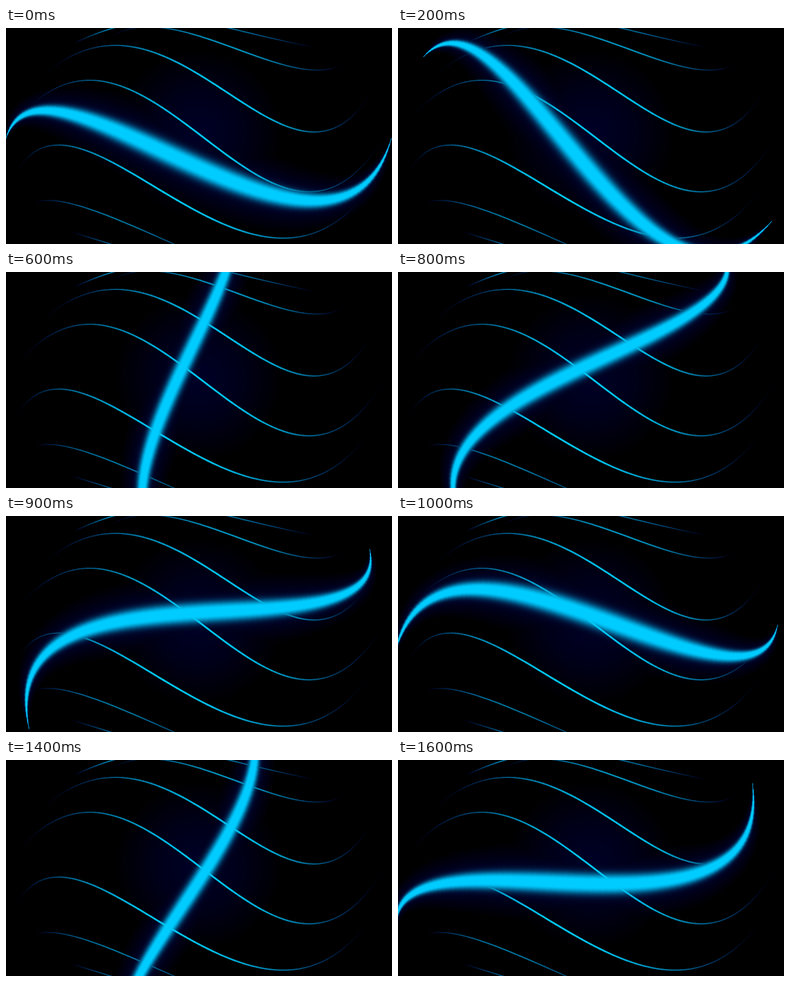
Animation, 662 px wide and 372 px high, one loop 1700 ms. Source, as an HTML page with a canvas:

```html
<!DOCTYPE html>
<html lang="en">
<head>
<meta charset="utf-8">
<title>Rotating light wave</title>
<style>
  html, body { margin: 0; width: 662px; height: 372px; overflow: hidden; background: #000; }
  canvas { display: block; }
</style>
</head>
<body>
<canvas id="stage" width="662" height="372"></canvas>
<script>
const W = 662, H = 372, STEP = 100, STEPS = 17;
const ctx = document.getElementById('stage').getContext('2d');

// Every wave is one cubic Bezier; some run past the stage edge.
const BEAM = bezier([0, 190], [62, -12], [568, 512], [661, 190]);
const PIVOT = [334, 217], REST = [316, 190];
const THREADS = [
  bezier([115, 27], [160, 5], [205, -8], [250, -14]),
  bezier([178, 16], [290, -55], [480, 113], [577, 63]),
  bezier([240, -33], [340, -12], [435, 15], [532, 34]),
  bezier([60, 85], [290, -124], [480, 346], [626, 112]),
  bezier([20, 158], [242, -106], [455, 506], [648, 188]),
  bezier([17, 250], [128, 50], [420, 552], [622, 278]),
  bezier([50, 300], [110, 280], [250, 360], [400, 420]),
  bezier([112, 351], [160, 366], [230, 388], [300, 408])
];

function bezier(a, b, c, d, count = 90) {
  return Array.from({ length: count + 1 }, (_, i) => {
    const t = i / count, s = 1 - t;
    return a.map((v, k) =>
      s * s * s * v + 3 * s * s * t * b[k] + 3 * s * t * t * c[k] + t * t * t * d[k]);
  });
}

const mix = (a, b, t) => a + (b - a) * t;
const clamp = t => Math.max(0, Math.min(1, t));
const ease = t => (t = clamp(t), t * t * (3 - 2 * t));

// Strokes a curve piece by piece; style(bulge) gives [width, colour], bulge is 0 at both ends.
function strokeCurve(points, style) {
  for (let i = 1; i < points.length; i++) {
    const bulge = Math.sin(Math.PI * (i - .5) / (points.length - 1));
    [ctx.lineWidth, ctx.strokeStyle] = style(bulge);
    ctx.beginPath();
    ctx.moveTo(...points[i - 1]);
    ctx.lineTo(...points[i]);
    ctx.stroke();
  }
}

function drawHalo() {
  const halo = ctx.createRadialGradient(330, 182, 0, 330, 182, 146);
  halo.addColorStop(0, 'rgb(0,0,40)');
  halo.addColorStop(.5, 'rgb(0,0,25)');
  halo.addColorStop(1, '#000');
  ctx.fillStyle = halo;
  ctx.fillRect(0, 0, W, H);
}

// Threads dim towards their ends and away from the middle of the stage.
function drawThread(points) {
  const middle = (points[0][1] + points[points.length - 1][1]) / 2;
  const light = clamp(1.1 - ((middle - H / 2) / 240) ** 2);
  strokeCurve(points, bulge => {
    const glow = light * bulge ** 1.5, fade = clamp(4 * bulge);
    return [1 + 2 * bulge * light, `rgb(0,${200 * glow * fade},${(40 + 205 * glow) * fade})`];
  });
}

// Bright core with a soft edge inside a wide navy haze.
function beamColor(distance) {
  const core = Math.exp(-((Math.max(0, distance - 7) / 9) ** 2) / 2);
  return `rgb(0,${204 * core},${mix(55 * (1 - distance / 76), 255, core)})`;
}

// The beam turns with constant acceleration while its pivot drifts to rest.
function drawBeam(step) {
  const angle = (11.5 * step + .6 * step * step) * Math.PI / 180;
  const drift = ease((step - 2) / 4);
  const thick = 1 - .28 * Math.sin(angle) ** 2;
  ctx.save();
  ctx.translate(...PIVOT.map((v, k) => mix(v, REST[k], drift)));
  ctx.rotate(angle);
  ctx.translate(-PIVOT[0], -PIVOT[1]);
  for (let distance = 76; distance >= 6; distance -= 2) {
    const color = beamColor(distance);
    strokeCurve(BEAM, bulge => [2 * distance * thick * bulge ** 1.1, color]);
  }
  ctx.restore();
}

function draw(step) {
  ctx.globalCompositeOperation = 'source-over';
  drawHalo();
  ctx.globalCompositeOperation = 'lighten';
  ctx.lineCap = 'round';
  drawBeam(step);
  THREADS.forEach(drawThread);
}

let shown = -1;
function tick() {
  const step = Math.floor(performance.now() / STEP) % STEPS;
  if (step !== shown) draw(shown = step);
  requestAnimationFrame(tick);
}
tick();
</script>
</body>
</html>
```
